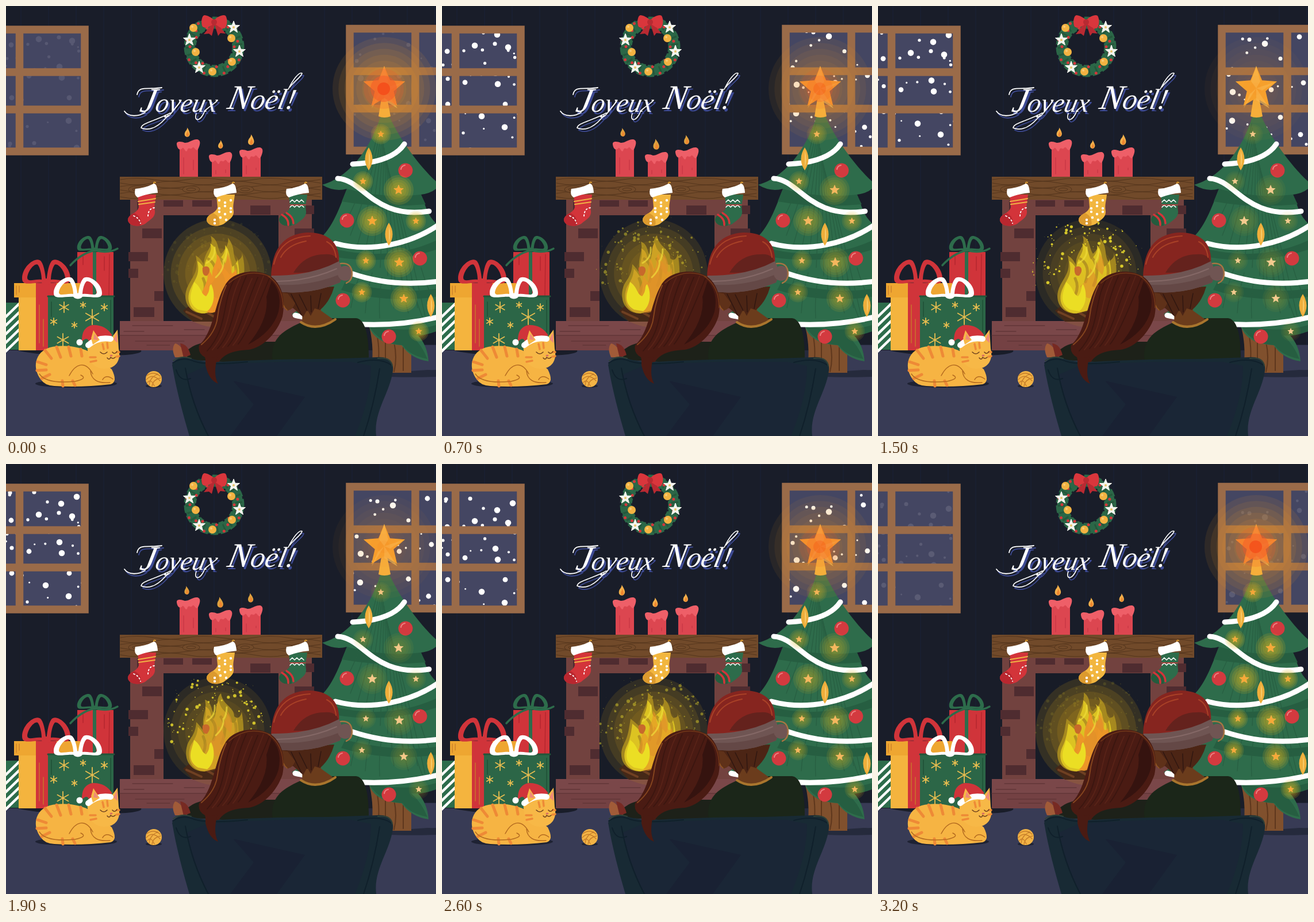
Animation, 748 px wide and 748 px high, one loop 3.3 s. Source, as an HTML page:

```html
<!DOCTYPE html>
<html lang="fr">
<head>
<meta charset="utf-8">
<title>Joyeux Noël</title>
<style>
html, body { margin: 0; width: 100%; height: 100%; overflow: hidden; background: #191d29; }
svg { display: block; width: 100vw; height: 100vh; }
text { font-family: "Liberation Serif", "Times New Roman", serif; font-style: italic; }
</style>
</head>
<body>
<svg id="stage" viewBox="0 0 748 748"></svg>
<script>
const LOOP = 3300, STEP = 100;
const stage = document.getElementById('stage');

let seed = 11;
const rnd = () => (seed = seed * 16807 % 2147483647) / 2147483647;
const range = (n, f) => Array.from({ length: n }, (_, i) => f(i)).join('');
const path = (d, fill, extra = '') => `<path d="${d}" fill="${fill}" ${extra}/>`;
const line = (d, color, w = 1, extra = '') =>
  `<path d="${d}" fill="none" stroke="${color}" stroke-width="${w}" stroke-linecap="round" stroke-linejoin="round" ${extra}/>`;
const rect = (x, y, w, h, fill, extra = '') =>
  `<rect x="${x}" y="${y}" width="${w}" height="${h}" fill="${fill}" ${extra}/>`;
const dot = (x, y, r, fill, extra = '') => `<circle cx="${x}" cy="${y}" r="${r}" fill="${fill}" ${extra}/>`;
const oval = (x, y, rx, ry, fill, extra = '') =>
  `<ellipse cx="${x}" cy="${y}" rx="${rx}" ry="${ry}" fill="${fill}" ${extra}/>`;
const group = (body, extra = '') => `<g ${extra}>${body}</g>`;
const at = (x, y, body, more = '') => group(body, `transform="translate(${x} ${y}) ${more}"`);

function star(x, y, r, fill, extra = '', inner = 0.45) {
  const pts = Array.from({ length: 10 }, (_, i) => {
    const a = (i / 5 - 0.5) * Math.PI, q = i % 2 ? r * inner : r;
    return (x + q * Math.cos(a)).toFixed(1) + ',' + (y + q * Math.sin(a)).toFixed(1);
  });
  return `<polygon points="${pts.join(' ')}" fill="${fill}" ${extra}/>`;
}
const rings = (x, y, r, n, color, alpha) =>
  range(n, i => dot(x, y, r * (1 - i * 0.8 / n), color, `opacity="${alpha}"`));

function room() {
  return rect(0, 0, 748, 748, '#191d29') +
    range(16, i => line(`M${26 + i * 48} 0V598`, '#1a2338')) +
    path('M0 599H748V748H0Z', '#383b55') +
    path('M20 599H235C240 606 200 609 150 608C100 608 50 607 20 599Z', '#191d29') +
    path('M570 599H690V589H748V600Q700 606 660 638L748 632V645Q690 648 570 640Z', '#252a3c') +
    path('M690 590H748V633Q700 635 668 612Z', '#383b55');
}

const flakes = [
  [72, 66, 3], [96, 69, 6], [92, 85, 4], [123, 57, 6], [49, 49, 4], [115, 91, 6], [57, 88, 6], [9, 98, 5],
  [7, 50, 4], [38, 97, 3], [93, 136, 6], [97, 155, 6], [40, 152, 5], [10, 146, 4], [69, 211, 6], [109, 230, 6],
  [110, 190, 5], [37, 240, 3], [10, 190, 5], [673, 72, 6], [646, 65, 4], [610, 126, 4], [700, 98, 4],
  [684, 152, 5], [617, 156, 6], [616, 206, 6], [700, 200, 5], [733, 60, 5], [740, 140, 5], [735, 230, 5]
];
for (let i = 0; i < 40; i++) flakes.push([i % 2 ? 600 + rnd() * 148 : rnd() * 132, 43 + rnd() * 205, 1.6 + rnd() * 1.6]);

function windows() {
  const frame = (x, y, w, mid) =>
    line(`M${x} ${y}H${x + w}V${y + 212}H${x}Z M${mid} ${y}V${y + 212} M${x} ${y + 74}H${x + w} M${x} ${y + 139}H${x + w}`,
      '#9a6b49', 13.5, 'style="stroke-linejoin:miter"');
  return rect(0, 40, 138, 214, '#444662') + rect(598, 40, 150, 212, '#444662') +
    '<g id="snow" fill="#fff" clip-path="url(#panes)"></g>' +
    frame(-30, 41, 167, 23.5) + frame(598, 39.5, 180, 712);
}

function wreath() {
  const flower = (x, y) => star(x, y, 11, '#f5f5ef', 'stroke="#f5f5ef" stroke-linejoin="round"', 0.42) + dot(x, y, 2, '#e8c46a');
  return dot(362, 71, 42, 'none', 'stroke="#2b6747" stroke-width="17"') +
    dot(362, 71, 42, 'none', 'stroke="#2b6747" stroke-width="21" stroke-dasharray="11 4"') +
    dot(362, 71, 43, 'none', 'stroke="#235339" stroke-width="12" stroke-dasharray="3 9" opacity=".8"') +
    range(26, i => {
      const a = i * 0.242, r = 42 + (i % 3 - 1) * 7;
      return dot(362 + r * Math.cos(a), 71 + r * Math.sin(a), 2.5, '#d3373b');
    }) +
    [[326, 38], [392, 56], [330, 80], [393, 97], [359, 114]].map(p => dot(...p, 7, '#f3b342') + dot(p[0] - 2, p[1] - 2, 2, '#f8cc77')).join('') +
    flower(319, 59) + flower(396, 37) + flower(406, 79) + flower(336, 107) +
    path('M359 30L344 49L353 48L358 52L363 33L369 52L373 47L382 48L366 29Z', '#b82a32') +
    path('M362 30C352 39 343 40 341 34C339 26 341 17 345 16C350 16 358 20 362 25C368 18 378 14 382 17C386 23 385 36 380 39C373 39 367 34 362 30Z', '#d9363c') +
    dot(362, 28, 5, '#b82a32');
}

function greeting() {
  const word = (x, y, first, rest) => at(x, y,
    `<text><tspan font-size="60">${first}</tspan><tspan font-size="${rest === 'oyeux' ? 46 : 50}">${rest}</tspan></text>`, 'skewX(-12)');
  const words = color => group(word(231, 184, 'J', 'oyeux') + word(383, 179, 'N', 'oël!'), `fill="${color}"`) +
    line('M228 154C231 138 247 146 271 142 M242 185C230 193 213 193 206 183', color, 1.8) +
    line('M282 190C268 208 251 219 235 212C236 203 260 200 286 186 M346 182C338 203 326 201 331 187', color, 1.6) +
    line('M494 141C502 130 514 123 515 117C510 114 499 128 491 145', color, 1.6);
  return at(3, 4, words('#3d4a93')) + words('#fff');
}

function candles() {
  const candle = (x, y) => rect(x, y + 8, 32, 297 - y - 8, '#dc4650') +
    line(`M${x + 7} ${y + 30}V292 M${x + 24} ${y + 34}V285`, '#c93945', 1.5) +
    path(`M${x - 5} ${y + 7}C${x - 6} ${y} ${x + 4} ${y + 2} ${x + 9} ${y + 4}C${x + 17} ${y + 4} ${x + 23} ${y - 3} ${x + 31} ${y - 2}C${x + 38} ${y} ${x + 35} ${y + 8} ${x + 33} ${y + 13}C${x + 29} ${y + 24} ${x + 25} ${y + 7} ${x + 22} ${y + 13}C${x + 18} ${y + 17} ${x + 15} ${y + 9} ${x + 13} ${y + 18}C${x + 9} ${y + 22} ${x + 8} ${y + 9} ${x + 4} ${y + 14}C${x} ${y + 18} ${x - 4} ${y + 14} ${x - 5} ${y + 7}Z`, '#ee5f68');
  return candle(302, 234) + candle(358, 256) + candle(411, 248) + '<g id="wicks"></g>';
}

function fireplace() {
  const bricks = [[274, 338, 34, 11], [324, 338, 34, 11], [425, 347, 35, 16], [237, 387, 34, 17], [213, 428, 34, 16],
    [213, 457, 17, 16], [258, 496, 16, 17], [222, 524, 36, 17], [505, 347, 31, 15], [502, 387, 34, 16], [228, 338, 20, 18]];
  return rect(216, 336, 316, 214, '#72423f') +
    rect(274, 364, 200, 184, '#181c27') +
    bricks.map(b => rect(...b, '#4f2c30')).join('') +
    rect(198, 548, 330, 51, '#7a4749') + rect(198, 573, 330, 26, '#744143') +
    line('M198 573H500 M220 556H290 M310 563H345 M225 583H310 M245 590H285 M205 566H240', '#613739', 1.3) +
    rect(198, 297, 352, 40, '#714a2a') +
    range(6, i => line(`M199 ${302 + i * 6}q28 ${i % 2 ? 6 : -5} 58 0t58 0t58 0t58 0t58 0t58 0`, '#55361d', 1.2)) +
    range(4, i => oval(228 + i * 94, 319, 15, 6, '#714a2a', 'stroke="#55361d"') + oval(228 + i * 94, 319, 8, 2.5, 'none', 'stroke="#55361d"'));
}

const poses = [
  ['#dcc322', 'M345 535C318 536 304 511 317 486C326 468 336 461 330 434C341 440 346 452 346 459C338 428 364 422 356 400C370 407 367 421 374 431C383 423 388 412 386 403C400 420 393 433 401 445C409 439 412 436 410 428C421 462 412 505 385 525Z'],
  ['#cda224', 'M345 535C322 535 308 515 315 490C318 478 330 472 331 449C340 457 341 464 345 464C338 438 351 431 346 410C360 415 356 431 363 434C371 425 364 407 374 399C377 420 397 422 397 439C403 444 408 441 410 431C417 468 414 503 385 525Z'],
  ['#dcc322', 'M345 535C314 534 306 508 316 488C325 471 326 456 328 443C339 452 344 456 345 462C341 434 360 424 358 398C373 407 364 426 374 430C381 420 391 419 383 405C403 422 393 434 403 442C409 440 413 440 407 428C424 463 414 503 385 525Z']
];

function flame([body, d]) {
  const within = (x, scale, color) => at(x, 530, group(path(d, color), 'transform="translate(-350 -530)"'), `scale(${scale})`);
  return group(
    path(d, '#ab8d20', 'opacity=".9"') + within(350, '.86 .9', body) +
    line('M352 440Q371 452 361 480 M374 440Q387 458 375 486 M399 451Q404 470 391 493 M343 474Q350 488 343 503', '#a98620', 5, 'opacity=".75"') +
    group(within(362, '.62 .76', '#ed9428'), 'class="hot"') +
    path('M342 455C352 449 359 458 350 469C343 471 341 463 342 455Z', '#c8692b') +
    path('M352 487Q366 478 369 456Q391 476 373 506Q360 515 352 487ZM376 452Q388 443 384 428Q399 448 390 468Z', '#e0902a', 'opacity=".6"') +
    path('M334 528C311 514 325 494 327 480C341 490 338 500 348 505C357 494 351 488 357 484C365 500 362 522 350 531Z', '#ebde24') +
    line('M349 447Q365 438 363 420 M378 445Q384 436 384 423 M365 472Q380 458 378 443', '#f0dc39', 3, 'opacity=".7"'), 'class="flame"');
}

function fire() {
  return group(rings(368, 465, 94, 6, '#cf9a1c', 0.16), 'id="fireGlow"') +
    path('M308 530L322 519L395 530L395 549L325 549Z', '#452817') + line('M314 532L340 544 M330 522L370 545', '#6f4022', 4) +
    poses.map(flame).join('') + '<g id="embers"></g>';
}

function stockings() {
  const shape = 'M229 328H261C260 340 257 346 259 357C260 368 249 373 242 379C231 385 214 383 212 373C212 361 228 362 231 350Z';
  const sock = (dx, fill, heel, trim) => at(dx, 0,
    line('M257 311Q256 305 260 307', '#d99a32', 2) + path(shape, fill) + path('M212 373C212 366 218 363 223 360Q237 366 234 382Q216 385 212 373Z', heel) +
    trim + path('M225 318Q242 317 257 309Q263 309 264 325Q247 326 229 333Q222 329 225 318Z', '#fff'));
  return sock(0, '#d3343a', '#b9272f', line('M230 340L260 335M231 345L259 341', '#f1b345', 2) +
      line('M222 365Q232 369 234 378M258 351Q247 352 247 367', '#fff', 1.8, 'stroke-dasharray="2 4"')) +
    sock(137, '#f2b63f', '#dc9a2e', range(13, i => dot(234 + i % 3 * 10 - (i > 8) * 8, 338 + (i / 3 | 0) * 10 + i % 2 * 4, 2.2, '#fff'))) +
    sock(263, '#2d6c4b', '#245b3d', line('M231 341l4 -4l4 4l4 -4l4 4l4 -4l4 4M231 350l4 -4l4 4l4 -4l4 4l4 -4l4 4', '#fff', 1.5) +
      line('M231 346H258', '#d3343a', 1.6) + line('M217 363Q229 370 228 381M225 360Q237 367 237 378', '#d3343a', 3.5));
}

const bulbs = [[652, 223, 6], [621, 305, 6], [683, 320, 9], [637, 374, 9], [713, 374, 6], [626, 443, 6],
  [684, 446, 9], [619, 498, 6], [692, 509, 8], [718, 566, 6]];

function tree() {
  return path('M632 558H705V638H634Q642 600 632 558Z', '#80502d') + line('M645 570Q652 605 645 634M660 580V632M675 585Q681 612 675 636M691 590V634', '#5e371d', 2) +
    path(`M653 186C640 235 604 296 550 311Q571 324 593 318C577 360 566 390 538 412Q556 430 577 424C562 470 540 510 497 536Q550 562 602 548
      L631 557Q642 588 688 590Q705 614 735 618Q733 590 716 572L748 566V378Q738 368 733 357L722 328Q738 326 748 318V305C715 275 681 225 664 186Z`, '#2e6c4b') +
    path('M593 318Q660 336 722 328L730 345Q650 352 584 340ZM577 424Q670 444 748 408V424Q660 452 570 436ZM590 480Q680 502 748 492V506Q660 518 583 494ZM631 556Q700 570 748 555V566Q725 575 705 573Q724 590 733 614Q702 608 690 590Q650 588 631 556Z', '#265e41') +
    range(12, i => line(`M${650 + i * 1.3} ${205 + i * 7}Q${632 + i * 5} ${300 + i * 5} ${586 + i * 13} ${385 + i * 14}`, '#285f42', 1.3)) +
    range(7, i => line(`M${620 + i * 17} ${455 + i % 3 * 9}q${i * 4 - 14} 35 ${i * 8 - 20} 70`, '#285f42', 1.3)) +
    ['M603 275Q672 272 693 240', 'M577 300C622 302 640 372 736 357', 'M573 413C635 430 705 413 752 381',
      'M600 465Q672 490 752 479', 'M503 538Q640 569 752 541'].map(d => line(d, '#fff', 9)).join('') +
    [[695, 286], [593, 373], [720, 439], [586, 512], [666, 575]].map(([x, y]) =>
      dot(x, y, 12.5, '#d33a3f') + line(`M${x - 8} ${y - 2}q1 -6 7 -7`, '#ee7f80', 2)).join('') +
    [[631, 266], [666, 397], [739, 521]].map(([x, y]) =>
      path(`M${x} ${y - 20}Q${x + 13} ${y} ${x} ${y + 20}Q${x - 13} ${y} ${x} ${y - 20}Z`, '#efae3b') +
      path(`M${x} ${y - 14}Q${x + 5} ${y} ${x} ${y + 15}Z`, '#f7c967')).join('') +
    group(bulbs.map(([x, y, r]) => rings(x, y, r * 2.9, 5, '#dcb522', 0.16)).join(''), 'class="glow"') +
    bulbs.map(([x, y, r]) => star(x, y, r, '#f4cf98')).join('') +
    group(bulbs.map(([x, y, r]) => star(x, y, r, '#f7a733')).join(''), 'class="hot"') +
    group(rings(658, 144, 90, 7, '#e79a27', 0.105), 'class="glow"') +
    path('M654 155L648 192Q658 196 669 192L662 155Z', '#f6ae3a') +
    star(658, 143, 38, '#f7a62d') + path('M658 104L665 131L658 143L649 131ZM692 132L668 147L658 143ZM681 178L658 164V143ZM636 178L647 153L658 143Z', '#fabd4f', 'opacity=".65"') +
    group(star(658, 143, 38, '#f57c2f', 'opacity=".6"') + dot(657, 144, 35, '#ef572b', 'opacity=".22"') +
      dot(657, 144, 23, '#f35828', 'opacity=".5"') + dot(657, 144, 11, '#f4501c'), 'class="hot"');
}

function gifts() {
  const loop = 'M0 0C-18 -6 -42 8 -42 -9C-42 -31 -17 -49 -9 -39C-3 -31 -1 -12 0 0Z M-8 -7C-20 -9 -33 -1 -33 -11C-31 -25 -18 -38 -14 -32C-10 -26 -8 -14 -8 -7Z';
  const bow = (x, y, sx, sy, color) => at(x, y, path(loop, color, 'fill-rule="evenodd"') +
    path(loop, color, 'fill-rule="evenodd" transform="scale(-1 1)"') + oval(0, -3, 8, 6, color), `scale(${sx} ${sy})`);
  const flake = (x, y, r) => line(range(3, i => {
    const a = i * Math.PI / 3 + Math.PI / 2, dx = r * Math.cos(a), dy = r * Math.sin(a);
    return `M${x - dx} ${y - dy}L${x + dx} ${y + dy}`;
  }), '#e7bd50', 1.8);
  return rect(124, 428, 63, 90, '#d0343a') + line('M180 432L179 505M171 436V460M134 432V450', '#b3262e', 1.4) + rect(151, 428, 6, 80, '#2d6c4b') +
    bow(154, 426, .72, .62, '#2d6c4b') + line('M154 425Q130 431 112 451M154 425Q178 431 194 422', '#2d6c4b', 3.5) +
    rect(0, 516, 28, 82, '#2d6c4b') + range(5, i => line(`M-2 ${542 + i * 15}L27 ${514 + i * 15}`, '#fff', 4.5)) +
    rect(22, 505, 105, 94, '#f4b43e') + rect(14, 482, 115, 25, '#eea631') + rect(52, 482, 36, 117, '#d0343a') +
    line('M18 487V502M23 487V498M58 520V586M65 545V592', '#c87d2b', 1.3) + bow(70, 483, 1, 1, '#d0343a') +
    rect(73, 506, 114, 93, '#2c6647') + line('M73 505H188', '#22553a', 3) + line('M182 512V590M79 515V540', '#22553a', 2) +
    flake(101, 524, 9) + flake(150, 541, 13) + flake(99, 581, 11) + flake(134, 520, 5) + flake(171, 524, 6) + flake(83, 549, 6) + flake(119, 555, 5) +
    bow(125, 507, 1, .84, '#fff');
}

function cat() {
  const ink = '#b56c20';
  return oval(122, 657, 71, 7, '#1e2233') +
    path('M61 650C45 630 50 602 76 594C98 588 132 592 151 605L184 632Q195 654 182 658Q130 664 84 661Q67 660 61 650Z', '#f6b443') +
    line('M68 599L79 613M88 593L95 611M109 593L113 609M55 619L70 624M54 634L70 633M62 648L76 641M130 597L132 609M116 652L120 660M98 652L99 661', '#ee8a36', 5) +
    line('M58 640Q70 658 120 653Q143 648 130 642M110 643C121 622 138 616 151 640M147 635Q149 658 181 655M168 650Q174 640 186 649', ink, 1.5) +
    path('M143 607C140 590 143 581 148 577L150 567L163 579Q174 575 183 578L194 563L196 596C201 617 190 631 172 631C156 631 145 621 143 607Z', '#f7b847') +
    path('M187 580L193 568L194 586Z', '#ee8979') +
    line('M168 588L170 597M176 586L177 595M146 611L156 611M147 619L157 617M193 602L197 602M192 610L197 609', '#ee8a36', 3.5) +
    line('M164 602Q170 608 176 602M185 602Q189 607 193 601M176 612Q180 617 182 611Q186 615 190 611', '#70431e', 1.6) + oval(183, 608, 2.5, 1.6, '#d86b62') +
    path('M132 584Q131 558 151 555Q173 554 185 573L146 589Q143 572 132 584Z', '#d0343a') +
    line('M143 590Q160 575 182 579', '#fff', 10) + path('M148 578L152 564L163 581L151 589Z', '#f7b847') + path('M152 580L154 570L161 581Z', '#ee8979') +
    dot(128, 585, 5.5, '#fff') +
    oval(257, 661, 14, 3, '#1e2233') + dot(257, 649, 14, '#f3b345') +
    line('M245 643Q257 634 268 644M244 650Q255 638 268 652M249 660Q250 646 264 640M254 662Q255 650 269 647M246 655Q252 647 258 661', '#c37b29', 1.3);
}

function couple() {
  return path('M309 615C308 598 328 588 350 584H480V625Z', '#1d2119') +
    path('M316 612Q304 588 294 587Q287 596 294 611Z', '#a15b38') + path('M303 587Q316 588 321 607L309 612Z', '#772a23') +
    path('M464 620C458 578 482 565 512 551L566 543L609 543Q632 546 631 620Z', '#1b2619') +
    path('M516 523L515 553Q540 566 569 545L548 530V515Z', '#6b3c1c') + line('M513 550Q540 568 573 545', '#a9752d', 4) +
    path('M478 493Q480 510 486 520L500 526L517 541L524 528L530 539L537 526L546 529Q564 514 571 488Z', '#4c2515') +
    path('M478 498Q478 522 490 530Q499 528 503 517L490 500Z', '#5f3119') + line('M480 505Q480 522 489 529', '#94571f', 1.5) +
    line('M496 501L514 537M510 502L524 530M530 504L531 532M548 500L543 526', '#301711', 1.5) +
    path('M461 472C462 421 484 396 525 394C562 394 582 413 579 449Q530 470 461 472Z', '#86251f') +
    path('M500 464Q519 432 554 432Q578 430 579 451Q545 465 500 464Z', '#59221c', 'opacity=".75"') +
    line('M466 449Q477 402 529 400M478 437Q490 415 522 409M558 410Q572 417 574 437', '#a94127', 2) +
    path('M462 469Q530 470 579 444Q590 462 581 481Q525 505 467 496Q460 484 462 469Z', '#6f5553') +
    path('M464 484Q525 490 583 466Q585 474 581 481Q525 505 467 496Z', '#644846') +
    line('M470 479Q525 479 575 457', '#846866', 2) +
    dot(590, 465, 13, '#705553') + line('M582 448Q602 446 602 466Q602 478 592 482', '#a87443', 2.5) +
    path('M381 486C394 462 433 455 460 470C482 484 486 514 481 540C472 568 448 594 422 598C396 599 370 605 365 634Q361 651 369 657C352 650 349 623 346 611Q333 604 336 590C362 566 362 518 381 486Z', '#4a1b13') +
    path('M462 478Q481 498 474 532Q463 568 421 589Q458 545 453 506Z', '#35130f') +
    range(7, i => line(`M${398 + i * 10} ${474 - i % 3 * 2}C${374 + i * 10} ${515 + i * 3} ${388 + i * 5} ${558 + i * 2} ${350 + i * 9} ${600 - i * 2}`, i % 2 ? '#592318' : '#3b1610', 1.8)) +
    line('M383 486Q371 514 368 541T340 589', '#85451f', 2) + line('M388 482Q421 454 460 471M456 470Q482 487 482 525', '#733819', 1.5) +
    path('M289 624Q300 604 328 615L356 620Q455 614 560 614L645 611Q676 609 673 635C667 675 639 706 644 748H319C308 710 296 667 289 624Z', '#182a34') +
    path('M350 626Q450 617 600 619L635 626Q635 680 607 748H352Q319 689 315 641Z', '#1a2636') +
    path('M395 652L520 680L471 748H390L431 693Z', '#192133') +
    line('M290 621Q307 609 327 618Q350 626 420 619M671 625Q650 610 612 620M312 630Q323 693 352 748M650 631Q640 695 622 748M296 633Q303 655 321 648', '#10202b', 2) +
    line('M291 617Q304 607 322 613M647 613Q669 610 672 626', '#304037', 2) +
    path('M347 608Q361 617 369 606Q359 640 369 657Q353 651 347 625Z', '#4a1b13');
}

stage.innerHTML = `<defs><clipPath id="panes">${rect(0, 43, 132, 206, '#fff')}${rect(603, 43, 145, 206, '#fff')}</clipPath></defs>` +
  room() + windows() + wreath() + greeting() + candles() + fireplace() + fire() + stockings() +
  tree() + gifts() + cat() + couple();

const sparks = Array.from({ length: 120 }, () => ({
  angle: Math.PI * (0.91 + rnd() * 1.16), start: rnd(), size: 0.8 + 2.4 * rnd() ** 3
}));
const byId = id => document.getElementById(id);
const all = name => [...stage.querySelectorAll(name)];
const parts = { glow: all('.glow'), hot: all('.hot'), flame: all('.flame') };
const teardrop = 'M0 9C-7 8 -6 0 -2 -4Q0 -7 0 -10Q7 0 6 4Q5 9 0 9Z';

function draw(time) {
  const t = Math.floor(time % LOOP / STEP) * STEP;
  const fromStart = Math.min(t, LOOP - t);
  const warmth = 1 - fromStart / (LOOP / 2);
  const phase = t / STEP % 3;

  parts.glow.forEach(g => g.setAttribute('opacity', 0.3 + 0.7 * warmth));
  parts.hot.forEach(g => g.setAttribute('opacity', warmth));
  parts.flame.forEach((g, i) => g.setAttribute('display', i === phase ? 'inline' : 'none'));
  byId('fireGlow').setAttribute('opacity', 0.65 + 0.35 * warmth);

  const snow = byId('snow');
  snow.setAttribute('opacity', Math.min(1, 0.1 + 0.9 * (fromStart / 700) ** 2));
  snow.innerHTML = flakes.map(([x, y, r]) =>
    dot(x, 36 + (y - 36 + (t - 1900) * 0.016 + 220) % 220, r * 0.88, '#fff')).join('');

  const embers = byId('embers');
  embers.setAttribute('opacity', 0.07 + 0.9 * (1 - warmth));
  embers.innerHTML = sparks.map(s => {
    const k = (s.start + t / LOOP) % 1, r = 42 + 62 * k;
    return dot(368 + r * Math.cos(s.angle), 465 + r * Math.sin(s.angle), s.size * Math.min(1, 5 * k, 5 * (1 - k)), '#eadb2d');
  }).join('');

  byId('wicks').innerHTML = [[314, 220], [372, 241], [425, 233]].map(([x, y], i) => {
    const size = [0.86, 0.78, 0.98][(phase + i) % 3];
    return at(x + (phase === 2 ? -1.5 : phase ? 0 : 1), y,
      path(teardrop, phase === 1 ? '#dda13f' : '#f3b04b') + path(teardrop, '#ef8730', 'transform="translate(1 3) scale(.5 .6)"'),
      `rotate(${[3, -5, 1][phase]}) scale(${size * 0.95} ${size})`);
  }).join('');
}

const begin = performance.now();
function tick() {
  draw(performance.now() - begin);
  requestAnimationFrame(tick);
}
tick();
</script>
</body>
</html>
```
